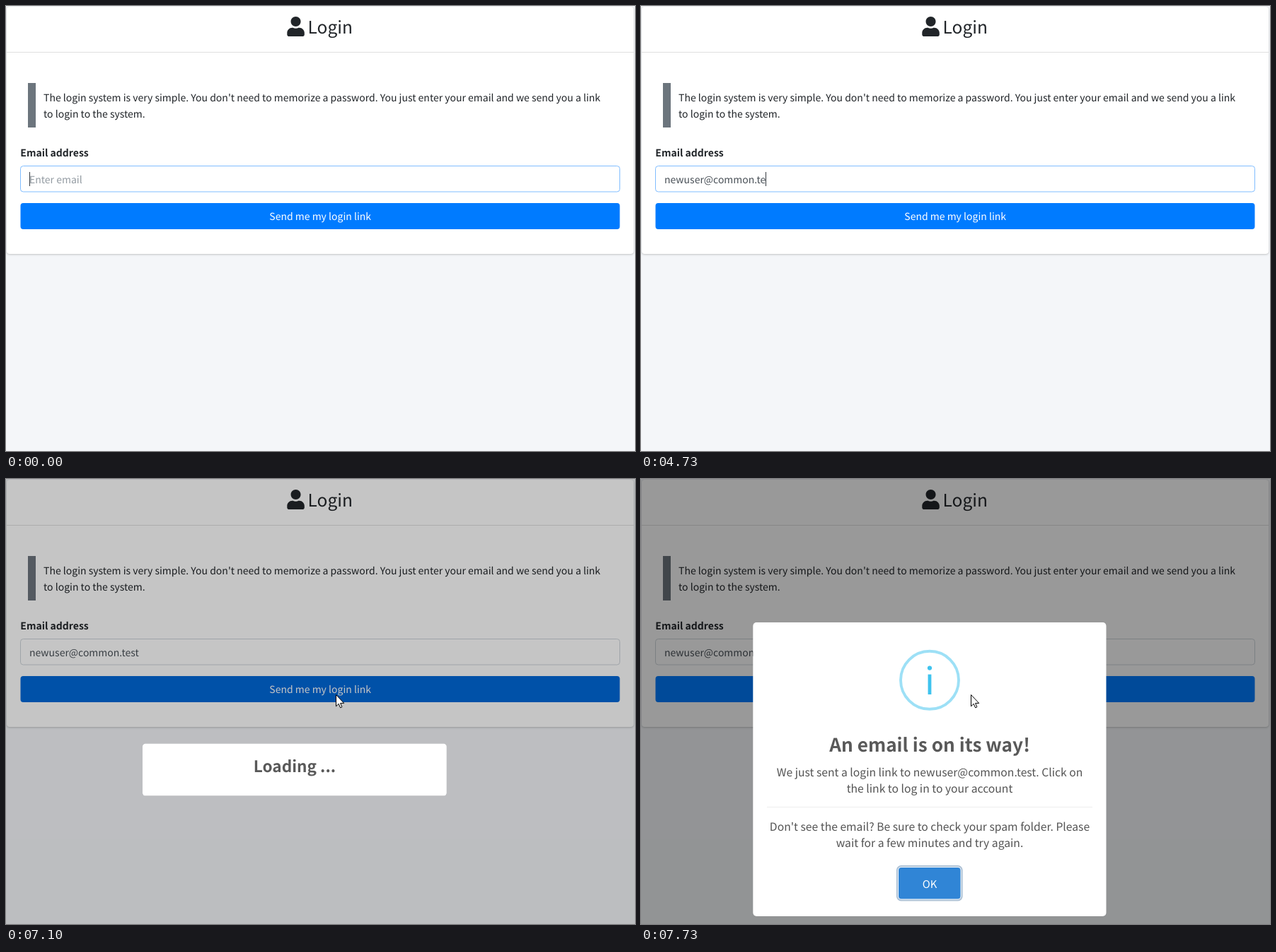
An HTML page for the animation above (8000 ms loop, 889 by 630 pixels).

```html
<!DOCTYPE html>
<html lang="en">
<head>
<meta charset="utf-8">
<title>Login</title>
<style>
  html, body { margin: 0; width: 100%; height: 100%; overflow: hidden; background: #f4f6f9; }
  .card {
    position: absolute; left: 1px; top: 1px; width: 886px; height: 350px;
    background: #fff; border-radius: 4px;
    box-shadow: 0 0 1px rgba(0,0,0,.125), 0 1px 3px rgba(0,0,0,.2);
  }
  svg { position: absolute; left: 0; top: 0; }
  text {
    font: 14px "Noto Sans CJK JP", "Noto Sans CJK SC", "Noto Sans CJK", "Noto Sans", sans-serif;
    text-rendering: geometricPrecision; fill: #212529;
  }
  .middle { text-anchor: middle; }
  .heading { font-size: 24.5px; }
  .bold { font-weight: 700; }
  .white { fill: #fff; }
  .popup { transform-origin: 408px 411px; }
  .popup text { font-size: 15.7px; fill: #545454; text-anchor: middle; }
  .popup .title { font-size: 26.2px; font-weight: 700; fill: #595959; }
  .popup .mark { font-size: 52.3px; fill: #3fc3ee; }
  .popup .ok { font-size: 14.8px; fill: #fff; }
</style>
</head>
<body>
<div class="card"></div>
<svg width="889" height="630" viewBox="0 0 889 630">
  <path fill="#212529" transform="translate(397.3 15) scale(.0547)" d="M224 256c70.7 0 128-57.3 128-128S294.7 0 224 0 96 57.3 96 128s57.3 128 128 128zm89.6 32h-16.7c-22.2 10.2-46.9 16-72.9 16s-50.6-5.8-72.9-16h-16.7C60.2 288 0 348.2 0 422.4V464c0 26.5 21.5 48 48 48h352c26.5 0 48-21.5 48-48v-41.6c0-74.2-60.2-134.4-134.4-134.4z"/>
  <text class="heading" x="426.6" y="39">Login</text>
  <rect x="1" y="65" width="886" height="1" fill="#dfdfdf"/>

  <rect x="31" y="109" width="11" height="63" fill="#6c757d"/>
  <text x="53" y="134.5">The login system is very simple. You don't need to memorize a password. You just enter your email and we send you a link</text>
  <text x="53" y="158">to login to the system.</text>

  <text class="bold" x="20.3" y="212.7">Email address</text>
  <rect id="field" x="20.5" y="226.5" width="847" height="36.5" rx="3.9" fill="#fff"/>
  <text id="placeholder" x="33" y="250.5" style="fill:#939ba2">Enter email</text>
  <text id="email" x="33" y="250.5" style="fill:#495057"></text>
  <rect id="caret" y="235" width="1" height="20" fill="#343a40"/>

  <rect id="button" x="20.5" y="279" width="847" height="37" rx="3.9"/>
  <text class="middle white" x="444.2" y="303">Send me my login link</text>

  <rect id="shade" width="889" height="630"/>

  <g id="loading" class="popup">
    <rect x="158.3" y="368.8" width="499" height="85.6" rx="4.9" fill="#fff"/>
    <text class="title" x="408" y="416.2">Loading ...</text>
  </g>

  <g id="info" class="popup">
    <rect x="158.3" y="203" width="499.2" height="416" rx="4.9" fill="#fff"/>
    <circle cx="408" cy="284.8" r="41" fill="none" stroke="#9de0f6" stroke-width="3.9"/>
    <text class="mark" x="408" y="305">i</text>
    <text class="title" x="408" y="385.7">An email is on its way!</text>
    <text id="sent" x="408" y="421"></text>
    <text x="408" y="443.7">the link to log in to your account</text>
    <rect x="178" y="464" width="460" height="1" fill="#eee"/>
    <text x="408" y="498">Don't see the email? Be sure to check your spam folder. Please</text>
    <text x="408" y="520.7">wait for a few minutes and try again.</text>
    <rect x="361" y="547" width="93.6" height="50.5" rx="6.5" fill="rgba(50,100,150,.4)"/>
    <rect x="363" y="549" width="89.6" height="46.5" rx="4.8" fill="#fff"/>
    <rect x="364" y="550" width="87.6" height="44.5" rx="3.9" fill="#3085d6"/>
    <text class="ok" x="408" y="578.5">OK</text>
  </g>

  <path id="pointer" d="M.5.5V16.8L4.2 13.3 6.6 18.8 8.9 17.8 6.6 12.4H11.7Z" fill="#fff" stroke="#000"/>
</svg>
<script>
const LOOP = 8000;
const ADDRESS = "newuser@common.test";
const BURSTS = [
  { start: 550, end: 1610, keys: 7 },
  { start: 2450, end: 3960, keys: 7 },
  { start: 4210, end: 4850, keys: 5 },
];
const BLINK = 550;
const POINTER_START = 6095, POINTER_TIME = 550;
const HOVER = 6450, RELEASE = 7100;
const LOADING_OPEN = 7058, INFO_OPEN = 7322;

const $ = id => document.getElementById(id);
const ramp = (t, start, length) => Math.min(1, Math.max(0, (t - start) / length));
const show = (node, visible) => { node.style.display = visible ? "" : "none"; };

// The pointer and the popups are refreshed eight times a second.
const refreshTime = t => Math.floor((t - 95) / 125) * 125 + 95;

function createPopup(node, open, close) {
  const bounce = node.animate([
    { transform: "scale(.7)", easing: "ease" },
    { transform: "scale(1.05)", offset: .45, easing: "ease" },
    { transform: "scale(.95)", offset: .8, easing: "ease" },
    { transform: "scale(1)" },
  ], { duration: 300, fill: "both" });
  bounce.pause();
  return t => {
    show(node, t >= open && t < close);
    bounce.currentTime = Math.min(300, Math.max(0, t - open));
  };
}

const drawLoading = createPopup($("loading"), LOADING_OPEN, INFO_OPEN);
const drawInfo = createPopup($("info"), INFO_OPEN, LOOP);

function drawField(t, focused) {
  let count = 0, lastKey = 400 - BLINK;
  for (const { start, end, keys } of BURSTS) {
    if (t < start) break;
    count += 1 + Math.floor((keys - 1) * ramp(t, start, end - start) ** 1.5);
    lastKey = Math.min(t, end);
  }
  const email = $("email");
  email.textContent = ADDRESS.slice(0, count);
  show($("placeholder"), !count);
  show($("caret"), t < HOVER + BLINK && Math.floor((t - lastKey) / BLINK) % 2 === 0);
  $("caret").setAttribute("x", Math.floor(33 + (count ? email.getComputedTextLength() : 0)));
  $("field").setAttribute("stroke", focused ? "#80bdff" : "#ced4da");
}

function drawPointer(t) {
  const progress = 1 - (1 - ramp(t, POINTER_START, POINTER_TIME)) ** 3;
  show($("pointer"), t >= POINTER_START);
  $("pointer").setAttribute("transform",
    `translate(${Math.round(798 - 332 * progress)} ${Math.round(329 - 24 * progress ** 4)})`);
}

function draw(t) {
  const refreshed = refreshTime(t);
  drawField(t, refreshed < LOADING_OPEN);
  drawPointer(refreshed);

  const hover = ramp(t, HOVER, 150) - ramp(t, RELEASE, 100);
  $("button").style.fill = `color-mix(in srgb, #0069d9 ${hover * 100}%, #007bff)`;

  $("shade").setAttribute("fill-opacity", .4 * ramp(refreshed, LOADING_OPEN, 65));
  drawLoading(refreshed);
  drawInfo(refreshed);
}

$("sent").textContent = `We just sent a login link to ${ADDRESS}. Click on`;

const origin = performance.now();
function tick() {
  draw((performance.now() - origin) % LOOP);
  requestAnimationFrame(tick);
}
tick();
</script>
</body>
</html>
```
